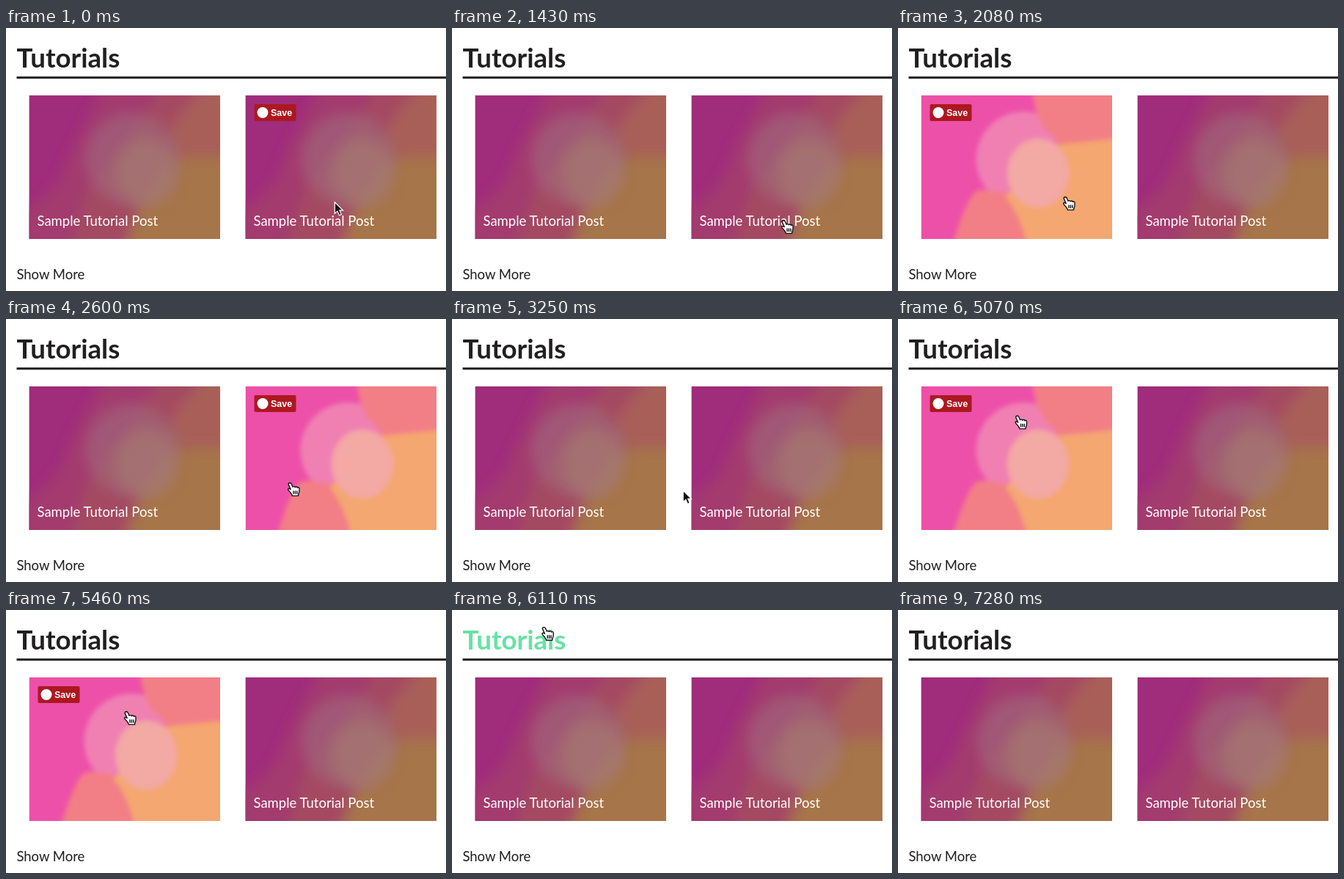
Animation of 600x359 px, one loop 7.41 s. Source, as an HTML page:

```html
<!DOCTYPE html>
<html lang="en">
<head>
<meta charset="utf-8">
<title>Tutorial cards</title>
<style>
  html, body { margin: 0; width: 100%; height: 100%; overflow: hidden; background: #fff; }
  svg { display: block; }
  text { font: 18.5px Lato, sans-serif; fill: #211f20; }
  #heading { font-size: 36.7px; font-weight: 700; }
  #heading.hover { fill: #67e2a4; }
  text.title { fill: #fff; }
  text.label { font: bold 12.5px "Liberation Sans", Arial, sans-serif; fill: #fff; }
</style>
</head>
<body>
<svg width="600" height="359" viewBox="0 0 600 359">
  <defs>
    <filter id="soft" x="-30%" y="-30%" width="160%" height="160%"><feGaussianBlur stdDeviation="3"/></filter>
    <filter id="softer" x="-30%" y="-30%" width="160%" height="160%"><feGaussianBlur stdDeviation="9"/></filter>
    <ellipse id="disc" cx="159.5" cy="106" rx="42" ry="47"/>

    <symbol id="bright">
      <rect width="261" height="196" fill="#ed50a9"/>
      <g filter="url(#soft)">
        <circle cx="140" cy="87" r="65" fill="#f080b2"/>
        <path d="M150 -20C154 20 160 42 180 56L200 90H290V-20Z" fill="#f27f86"/>
        <path d="M38 220C50 180 62 140 76 130C90 126 125 134 170 150V220Z" fill="#f27f86"/>
        <path d="M290 56C250 62 215 64 185 68L115 138C132 160 140 180 148 220H290Z" fill="#f4a770"/>
        <use href="#disc" fill="#f3a9a4"/>
      </g>
    </symbol>

    <symbol id="dark">
      <rect width="261" height="196" fill="#a02c7c"/>
      <g filter="url(#softer)">
        <path d="M112 -40C85 30 62 60 50 95C40 125 15 145 -10 160V240H300V-40Z" fill="#a33b6e"/>
        <path d="M190 -40C150 60 95 100 75 140L45 240H300V-40Z" fill="#a44a62"/>
        <path d="M235 -10C215 20 180 40 190 95H310V-40Z" fill="#a85e58"/>
        <path d="M310 84H215C170 95 155 140 118 240H310Z" fill="#a67549"/>
        <circle cx="140" cy="87" r="62" fill="#a07080" opacity=".55"/>
      </g>
      <use href="#disc" fill="#a67a70" opacity=".65" filter="url(#softer)"/>
    </symbol>

    <g id="badge">
      <rect x="12" y="12" width="57" height="23" rx="2" fill="#ad1820"/>
      <circle cx="23.5" cy="23.5" r="7.5" fill="#fff"/>
      <text class="label" x="34.5" y="28">Save</text>
    </g>
  </defs>

  <text id="heading" x="14.6" y="54">Tutorials</text>
  <rect x="14.5" y="66.2" width="586" height="3" fill="#211f20"/>
  <g id="cards"></g>
  <text x="14.4" y="343">Show More</text>

  <g id="pointer">
    <path id="arrow" d="M.8 .8V16.2L4.4 12.9L6.9 18.8L9.8 17.6L7.3 11.8H12Z" fill="#111" stroke="#fff" stroke-width="1.2"/>
    <g id="hand" stroke="#111" stroke-width="1.4" stroke-linejoin="round" stroke-linecap="round">
      <path fill="#fff" d="M3 .8C1.2 .8 .8 2 1.5 3.6L4.2 9.6C3 8.6 1 8 .6 9.4C.4 10.6 2 11.6 3.2 13C4.4 15 6 16 6.4 18.4H14.4C14.4 16.6 16 14 16 11.4V8.4C16 6.8 14 6.4 13.4 7.4C13 5.8 10.8 5.6 10.2 6.8C9.6 5.4 7.6 5.4 7 6.2L5 1.8C4.6 1 4 .8 3 .8Z"/>
      <path fill="none" d="M8 12V15.6M10.4 12V15.6M12.8 12V15.6"/>
    </g>
  </g>
</svg>
<script>
  const LOOP = 7410, STEP = 130;
  const AWAKE = 1040;  // links react to the pointer from here
  const GONE = 6630;   // the pointer disappears here
  const $ = id => document.getElementById(id);

  const heading = { x: 14, y: 14, w: 143, h: 46 };
  const cards = [31.5, 326.5].map(x => ({ x, y: 92, w: 260.5, h: 196 }));

  // Pointer stops: arrival time, x, y
  const stops = [
    [0, 447.5, 237], [520, 455, 338], [AWAKE, 455, 338], [1300, 452, 292],
    [1430, 449, 262], [1820, 436, 238], [2080, 225, 230], [2340, 225, 230],
    [2600, 384, 223], [3120, 318, 320], [3770, 308, 80], [4030, 150, 46],
    [4160, 146, 23], [4420, 140, 40], [4680, 155, 112], [5460, 161, 138],
    [5850, 140, 45], [6240, 120, 20], [GONE, 120, 20]
  ];

  const easeOut = k => 1 - (1 - k) ** 2;

  function pointerAt(t) {
    const next = stops.findIndex(stop => stop[0] > t);
    if (next < 1) return null;
    const [t0, x0, y0] = stops[next - 1], [t1, x1, y1] = stops[next];
    const k = easeOut((t - t0) / (t1 - t0));
    return [x0 + (x1 - x0) * k, y0 + (y1 - y0) * k];
  }

  function hovers(box, t) {
    const p = t >= AWAKE && pointerAt(t);
    return !!p && p[0] >= box.x && p[0] < box.x + box.w && p[1] >= box.y && p[1] < box.y + box.h;
  }

  $("cards").innerHTML = cards.map(({ x, y, w, h }) => `
    <g transform="translate(${x} ${y})">
      <use href="#bright" width="${w}" height="${h}"/>
      <g class="shade">
        <use href="#dark" width="${w}" height="${h}"/>
        <text class="title" x="11" y="177.5">Sample Tutorial Post</text>
      </g>
      <use class="save" href="#badge"/>
    </g>`).join("");
  const shades = document.querySelectorAll(".shade");
  const saves = document.querySelectorAll(".save");
  const show = (el, visible) => el.setAttribute("visibility", visible ? "visible" : "hidden");

  function draw() {
    const t = Math.floor(performance.now() % LOOP / STEP) * STEP;
    const lagged = t - STEP;  // cards react one step after the pointer

    $("heading").classList.toggle("hover", hovers(heading, t));
    cards.forEach((card, i) => {
      const lit = hovers(card, lagged);
      show(shades[i], !lit);
      show(saves[i], lit || (t === 0 && i === 1));
    });

    const pointer = pointerAt(t);
    const onLink = [heading, ...cards].some(box => hovers(box, t));
    show($("arrow"), pointer && !onLink);
    show($("hand"), pointer && onLink);
    if (pointer) $("pointer").setAttribute("transform", `translate(${pointer})`);
    requestAnimationFrame(draw);
  }
  draw();
</script>
</body>
</html>
```
